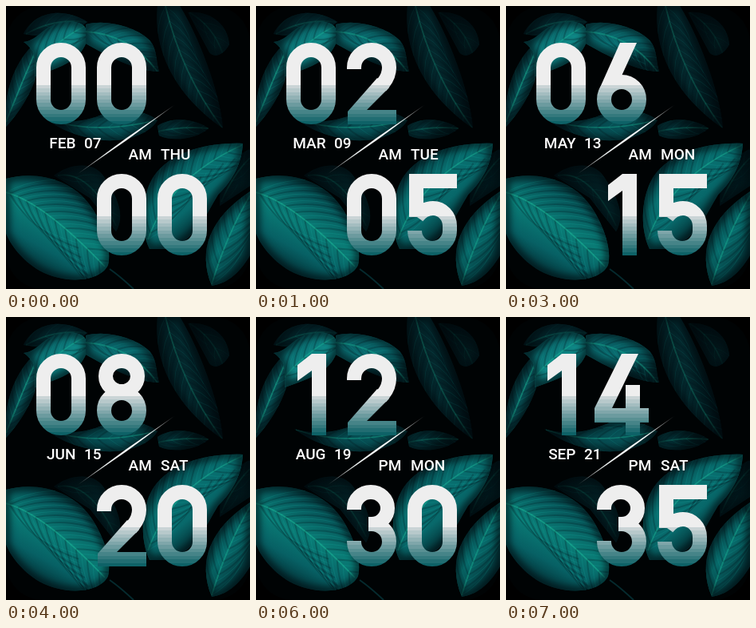
An HTML page with a canvas that plays this animation: 306x354 px, repeating every 8000 ms.

```html
<!DOCTYPE html>
<html lang="en">
<head>
<meta charset="utf-8">
<title>Leaf clock</title>
<style>
html, body { margin: 0; width: 100%; height: 100%; overflow: hidden; background: #000; }
canvas { display: block; }
</style>
</head>
<body>
<canvas id="stage" width="306" height="354"></canvas>
<script>
const W = 306, H = 354, STEP = 1000, COUNT = 8;
const ctx = document.getElementById('stage').getContext('2d');

const MONTHS = ['FEB', 'MAR', 'APR', 'MAY', 'JUN', 'JUL', 'AUG', 'SEP'];
const DAYS = ['THU', 'TUE', 'THU', 'MON', 'SAT', 'THU', 'MON', 'SAT'];

// Numerals in a 62 x 102 cell: a thick line and a filled part.
const DIGITS = {
  0: { line: 'M9 31A22 22 0 0 1 53 31V71A22 22 0 0 1 9 71Z' },
  1: { fill: 'M32 0H50V102H32V21L14 34V14Z' },
  2: { line: 'M9 33V31A22 22 0 0 1 53 31Q53 41 46 50L42 55',
       fill: 'M1 102V86L38 44L53 56L25 84H62V102Z' },
  3: { line: 'M9 31V29A21 20 0 0 1 51 29A20 20 0 0 1 31 49H27M31 49A22 22 0 0 1 53 71A22 22 0 0 1 9 71V70' },
  4: { fill: 'M31 0H52L19 68H36V39H54V68H65V86H54V102H36V86H-3V68Z' },
  5: { line: 'M62 9H11V54M12 54Q20 43 32 43A21 22 0 0 1 53 65V71A22 22 0 0 1 9 71' },
  6: { line: 'M9 71A22 22 0 0 1 53 71A22 22 0 0 1 9 71Z',
       fill: 'M29 0H50L27 50L3 58Z' },
  8: { line: 'M11 28A20 19 0 0 1 51 28A20 19 0 0 1 11 28ZM9 71A22 22 0 0 1 53 71A22 22 0 0 1 9 71Z' }
};
for (const d of Object.values(DIGITS)) {
  for (const part in d) d[part] = new Path2D(d[part]);
}

function gradient(g, [x0, y0, x1, y1], stops) {
  const paint = g.createLinearGradient(x0, y0, x1, y1);
  stops.forEach(([at, color]) => paint.addColorStop(at, color));
  return paint;
}

// White upper half, then hard bands down to teal.
function bandedPaint(bands) {
  const stops = [[0, '#eee'], [0.52, '#eee']];
  for (let i = 0; i < bands; i++) {
    const u = i / (bands - 1);
    const color = `rgb(${202 - 188 * u},${212 - 114 * u},${214 - 111 * u})`;
    stops.push([0.52 + 0.48 * i / bands, color], [0.52 + 0.48 * (i + 1) / bands, color]);
  }
  return gradient(ctx, [0, 0, 0, 102], stops);
}

const digitPaint = bandedPaint(11);

const slashPaint = gradient(ctx, [90, 210, 211, 124], [
  [0, 'rgba(255,255,255,.25)'], [0.3, '#e8eded'], [0.7, '#fff'], [1, 'rgba(255,255,255,.3)']
]);

// A leaf: shaded outline, soft dark rim, curved midrib and long side veins.
function leaf(g, outline, axis, colors, rib, veins, reach, glow) {
  const shape = new Path2D(outline);
  g.save();
  g.fillStyle = gradient(g, axis, colors.map((c, i) => [i / (colors.length - 1), c]));
  g.fill(shape);
  g.clip(shape);
  const [x0, y0, cx, cy, x1, y1] = rib;
  for (let i = 0; i < veins; i++) {
    const t = i / veins, s = 1 - t;
    const x = s * s * x0 + 2 * s * t * cx + t * t * x1;
    const y = s * s * y0 + 2 * s * t * cy + t * t * y1;
    const angle = Math.atan2(s * (cy - y0) + t * (y1 - cy), s * (cx - x0) + t * (x1 - cx));
    for (const side of [-1, 1]) {
      const a = angle + side * 0.75, b = angle + side * 0.35;
      g.beginPath();
      g.moveTo(x, y);
      g.quadraticCurveTo(x + Math.cos(a) * reach * 0.5, y + Math.sin(a) * reach * 0.5,
        x + Math.cos(b) * reach, y + Math.sin(b) * reach);
      g.strokeStyle = i % 2 ? 'rgba(0,22,28,.25)' : `rgba(20,165,155,${glow})`;
      g.lineWidth = i % 2 ? 2 : 1;
      g.stroke();
    }
  }
  g.beginPath();
  g.moveTo(x0, y0);
  g.quadraticCurveTo(cx, cy, x1, y1);
  g.strokeStyle = `rgba(30,190,155,${glow * 1.8})`;
  g.lineWidth = 1.8;
  g.stroke();
  g.filter = 'blur(5px)';
  g.strokeStyle = 'rgba(0,10,14,.75)';
  g.lineWidth = 9;
  g.stroke(shape);
  g.restore();
}

function paintLeaves() {
  const layer = document.createElement('canvas');
  layer.width = W;
  layer.height = H;
  const g = layer.getContext('2d');
  g.fillStyle = '#000';
  g.fillRect(0, 0, W, H);
  g.beginPath();
  g.roundRect(0, 0, W, H, 46);
  g.clip();
  g.fillStyle = '#000304';
  g.fillRect(0, 0, W, H);

  // Dim foliage
  leaf(g, 'M22 35C35 8 70 0 102 20L70 42Z', [20, 30, 100, 15], ['#02191d', '#053239'],
    [25, 35, 60, 15, 100, 20], 6, 30, 0.1);
  leaf(g, 'M190 0C184 55 212 112 272 153C268 105 240 35 218 0Z', [190, 70, 260, 60],
    ['#021418', '#04282d', '#010c10'], [200, 0, 220, 85, 271, 152], 18, 60, 0.13);
  leaf(g, 'M228 8C255 5 278 22 280 48C274 60 262 66 255 58Z', [230, 10, 280, 60],
    ['#010a0d', '#031c20'], [230, 8, 260, 25, 272, 60], 6, 35, 0.05);
  leaf(g, 'M60 212C80 197 108 194 121 211C140 238 150 262 138 282L105 240Z', [60, 210, 140, 270],
    ['#010c0f', '#031d21', '#032024'], [65, 212, 105, 205, 138, 275], 7, 40, 0.07);
  leaf(g, 'M270 205C290 188 304 178 306 180V225L268 250Z', [270, 200, 306, 230],
    ['#010d10', '#021c20'], [270, 245, 285, 210, 306, 190], 5, 30, 0.06);
  leaf(g, 'M48 140C80 150 108 142 130 132C155 127 178 133 190 143C178 163 140 174 105 165C80 160 62 150 48 140Z',
    [60, 140, 188, 155], ['#021b1f', '#064a4f', '#075257', '#032a2e'],
    [50, 141, 110, 162, 188, 143], 10, 60, 0.2);
  leaf(g, 'M190 150C210 137 238 142 254 153C238 167 208 170 192 162Z', [190, 145, 225, 168],
    ['#064247', '#043035', '#02191c'], [190, 157, 220, 150, 254, 153], 7, 30, 0.14);

  // Upper left and centre
  leaf(g, 'M0 151C-4 102 14 65 40 43C51 74 28 121 0 151Z', [0, 85, 42, 105],
    ['#021a1e', '#085156', '#031f23'], [0, 145, 20, 95, 42, 45], 10, 60, 0.26);
  leaf(g, 'M36 88C39 64 33 52 22 45C42 43 47 22 75 20C94 18 104 25 102 41C96 66 72 76 36 88Z',
    [45, 25, 85, 82], ['#07595f', '#0f8584', '#074e54'], [32, 80, 60, 45, 99, 25], 11, 50, 0.2);
  leaf(g, 'M100 23C128 15 169 29 181 44C190 55 188 70 192 82C163 82 125 61 100 47Z',
    [125, 22, 137, 75], ['#09595e', '#0a6c70', '#032a2f'], [100, 32, 155, 35, 190, 82], 13, 55, 0.2);

  // Large lower leaves
  leaf(g, 'M0 216C35 206 82 215 106 250C123 274 133 306 128 324C118 345 75 349 42 331C20 318 5 298 0 284Z',
    [92, 218, 30, 330], ['#032a2f', '#07595c', '#0a7c76', '#076064', '#032e33'],
    [0, 233, 48, 246, 124, 326], 20, 110, 0.26);
  leaf(g, 'M180 304C167 276 170 235 186 212C206 184 250 170 297 172C296 195 285 218 266 236C250 262 240 290 205 304Z',
    [195, 200, 255, 272], ['#043a40', '#087070', '#08686a', '#032b30'],
    [178, 292, 205, 215, 296, 174], 19, 95, 0.24);
  leaf(g, 'M258 350C240 306 255 266 306 232V312C291 337 276 347 258 350Z',
    [250, 270, 306, 312], ['#043338', '#086c6c', '#032f34'],
    [258, 348, 276, 288, 306, 237], 14, 80, 0.22);

  g.strokeStyle = '#052a2e';
  g.lineWidth = 2;
  g.beginPath();
  g.moveTo(130, 329);
  g.quadraticCurveTo(143, 338, 160, 354);
  g.stroke();
  return layer;
}

const background = paintLeaves();

function drawNumber(value, x, y) {
  [...String(value).padStart(2, '0')].forEach((char, i) => {
    const { line, fill } = DIGITS[char];
    ctx.save();
    ctx.translate(x + i * 76, y);
    ctx.fillStyle = ctx.strokeStyle = digitPaint;
    ctx.lineWidth = 18;
    if (fill) ctx.fill(fill);
    if (line) ctx.stroke(line);
    ctx.restore();
  });
}

function drawText(text, x, y, align = 'left') {
  ctx.textAlign = align;
  ctx.fillText(text, x, y);
}

function drawSlash() {
  ctx.fillStyle = slashPaint;
  ctx.beginPath();
  ctx.moveTo(90, 210);
  ctx.lineTo(149.8, 165.9);
  ctx.lineTo(211, 124);
  ctx.lineTo(151.2, 168.1);
  ctx.fill();
}

function draw(now) {
  const step = Math.floor(now / STEP) % COUNT;
  const hour = step * 2;
  ctx.drawImage(background, 0, 0);
  drawSlash();
  drawNumber(hour, 38, 46);
  drawNumber(step * 5, 114, 210);

  ctx.font = '500 19px Roboto, sans-serif';
  ctx.fillStyle = '#fff';
  drawText(MONTHS[step], 87.5, 178, 'right');
  drawText(String(7 + step * 2).padStart(2, '0'), 98, 178);
  drawText(hour < 12 ? 'AM' : 'PM', 153.5, 192);
  drawText(DAYS[step], 194, 192);
}

const start = performance.now();
function tick() {
  draw(performance.now() - start);
  requestAnimationFrame(tick);
}
tick();
</script>
</body>
</html>
```
